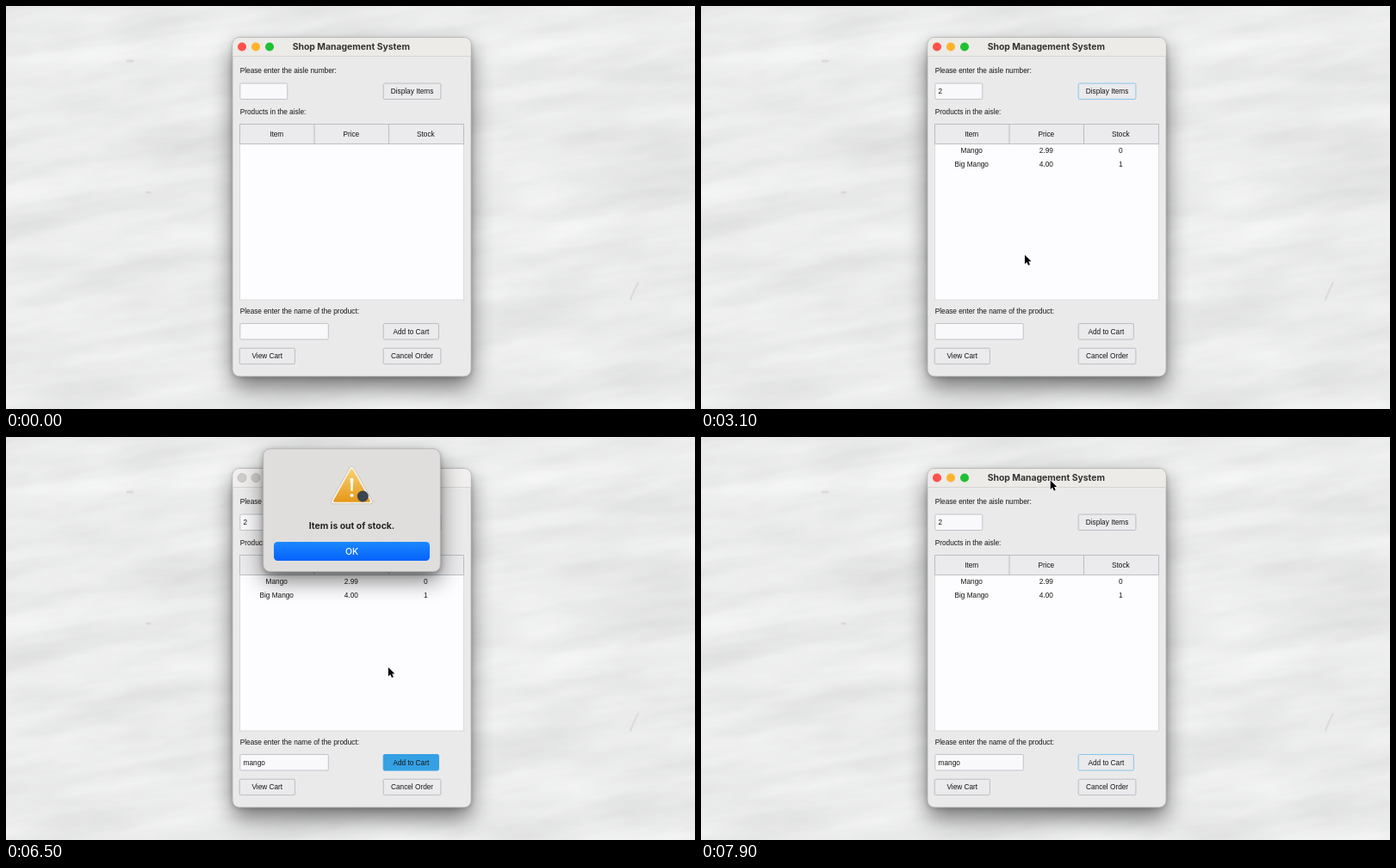
Write an HTML page that moves like this. It is 800 px wide and 469 px high and loops after 8000 ms.

```html
<!DOCTYPE html>
<html lang="en">
<head>
<meta charset="utf-8">
<title>Shop Management System</title>
<style>
  html, body { margin: 0; width: 100%; height: 100%; overflow: hidden; background: #ebebec; }
  svg { display: block; }
  text { font: 8.27px "Liberation Sans", Arial, sans-serif; fill: #161616; white-space: pre; }
  .mid { text-anchor: middle; }
  .title { font: 700 10.4px Inter, sans-serif; fill: #333; text-anchor: middle; }
  .button rect { fill: #ebeaec; stroke: #b9bec1; }
  .field rect { fill: #f9f8fa; stroke: #bec4c7; }
  .hover rect { stroke: #86c6ea; }
  .focus rect { stroke: #41ade8; stroke-width: 1.4; }
  .pressed rect { fill: #35a0e4; stroke: #35a0e4; }
  .inactive circle { fill: #cfcecd; stroke: #c2c1c0; }
  .inactive .bar { fill: #f0efee; }
  .inactive .title { fill: #aaa; }
</style>
</head>
<body>
<svg id="stage" width="800" height="469" viewBox="0 0 800 469">
  <defs>
    <filter id="plaster" x="0" y="0" width="1" height="1" color-interpolation-filters="sRGB">
      <feTurbulence type="fractalNoise" baseFrequency=".006 .028" numOctaves="5" seed="8"/>
      <feColorMatrix values=".12 0 0 0 .859  .12 0 0 0 .861  .12 0 0 0 .863  0 0 0 0 1"/>
    </filter>
    <filter id="soft" x="-50%" y="-50%" width="200%" height="200%"><feGaussianBlur stdDeviation="13"/></filter>
    <filter id="near" x="-50%" y="-50%" width="200%" height="200%"><feGaussianBlur stdDeviation="3"/></filter>
    <linearGradient id="gold" x2="0" y2="1"><stop stop-color="#f8cf71"/><stop offset="1" stop-color="#e5991b"/></linearGradient>
    <linearGradient id="blue" x2="0" y2="1"><stop stop-color="#1b88ff"/><stop offset="1" stop-color="#0562fa"/></linearGradient>
  </defs>

  <rect x="-60" y="-80" width="920" height="640" transform="rotate(-9 400 234)" filter="url(#plaster)"/>
  <g fill="none" stroke="#cfc9c4" stroke-linecap="round" opacity=".5">
    <path d="M725 342Q728 333 734 322" stroke-width="2"/>
    <path d="M164 217h3M141 64h6" stroke-width="3"/>
  </g>

  <rect x="263" y="50" width="277" height="394" rx="8" filter="url(#soft)" opacity=".5"/>
  <rect x="263" y="39" width="277" height="393" rx="8" filter="url(#near)" opacity=".24"/>

  <g id="win">
    <rect x="263" y="36.5" width="277" height="394.5" rx="8" fill="#ebeaeb" stroke="#b2b2b2" stroke-width=".8"/>
    <path class="bar" d="M263.4 58.5V44.5a7.6 7.6 0 0 1 7.6-7.6h261a7.6 7.6 0 0 1 7.6 7.6v14z" fill="#ecebe7"/>
    <path d="M263.4 58.5h276.2" stroke="#d5d4d2"/>
    <circle cx="274" cy="47.5" r="5" fill="#ff5049"/>
    <circle cx="290" cy="47.5" r="5" fill="#fcb32c"/>
    <circle cx="306" cy="47.5" r="5" fill="#1fc133"/>
    <text class="title" x="400.8" y="51.2">Shop Management System</text>
    <rect x="271.5" y="137.5" width="260" height="204.5" fill="#fdfcfe" stroke="#dadbdc"/>
    <path d="M271.5 137.5h260v23h-260zM358 137.5v23M444.5 137.5v23" fill="#ebeaec" stroke="#b8bfc1"/>
    <g id="form"></g>
    <g id="rows"></g>
  </g>

  <g id="alert">
    <rect x="299" y="25" width="205" height="142" rx="8" filter="url(#soft)" opacity=".5"/>
    <rect x="299" y="16" width="205" height="143" rx="8" filter="url(#near)" opacity=".3"/>
    <rect x="298.7" y="13.7" width="205.6" height="143" rx="8" fill="#dfdedd" stroke="#b3b2b1" stroke-width=".8"/>
    <path d="M401.5 37.5L422.5 75H380.5Z" fill="none" stroke="#b9b6ae" stroke-width="6.4" stroke-linejoin="round"/>
    <path d="M401.5 37.5L422.5 75H380.5Z" fill="none" stroke="#f7f3e8" stroke-width="5.2" stroke-linejoin="round"/>
    <path d="M401.5 38.5L421.5 74.5H381.5Z" fill="url(#gold)" stroke="url(#gold)" stroke-width="2.6" stroke-linejoin="round"/>
    <path d="M399.5 48h4l-1 15h-2z" fill="#fffaf0"/>
    <circle cx="401.5" cy="68" r="2.1" fill="#fffaf0"/>
    <circle cx="414.3" cy="69" r="6.5" fill="#3c444d"/>
    <text class="title" x="401.5" y="107.2" style="fill:#252525">Item is out of stock.</text>
    <rect x="311" y="122" width="181" height="22" rx="4.5" fill="url(#blue)"/>
    <text class="title" x="401.5" y="136.8" style="fill:#fff;font-weight:500">OK</text>
  </g>

  <g id="pointer">
    <path id="arrow" d="M0 0V10.4L2.4 8.2L4.1 12L6 11.2L4.4 7.5H7.6Z" stroke="#fff" stroke-width="1.3" paint-order="stroke" stroke-linejoin="round"/>
    <g id="beam" fill="none">
      <path d="M-3 -6Q0 -6 0 -4Q0 -6 3 -6M0 -4V4M-3 6Q0 6 0 4Q0 6 3 6M-1.5 1.5h3" stroke="#fff" stroke-width="2.4"/>
      <path d="M-3 -6Q0 -6 0 -4Q0 -6 3 -6M0 -4V4M-3 6Q0 6 0 4Q0 6 3 6M-1.5 1.5h3" stroke="#111" stroke-width="1.1"/>
    </g>
  </g>
</svg>
<script>
const LOOP = 8000, STEP = 100;
const $ = id => document.getElementById(id);
const label = (s, x, y, cls = '') => `<text class="${cls}" x="${x}" y="${y + 2.9}">${s}</text>`;
const box = (x, y, w) => `<rect x="${x + .5}" y="${y + .5}" width="${w - 1}" height="18.5" rx="1.5"/>`;
const button = (id, s, x, y, w) =>
  `<g id="${id}" class="button">${box(x, y, w)}${label(s, x + w / 2, y + 9.7, 'mid')}</g>`;
const field = (id, x, y, w) =>
  `<g id="${id}" class="field">${box(x, y, w)}${label('', x + 4.3, y + 9.7)}<path stroke="#111" stroke-width=".9"/></g>`;
const row = (cells, y) => cells.map((s, i) => label(s, 314.2 + i * 86.6, y, 'mid')).join('');

$('form').innerHTML =
  label('Please enter the aisle number:', 271.7, 75.5) +
  label('Products in the aisle:', 271.7, 123.3) +
  label('Please enter the name of the product:', 271.7, 355.5) +
  row(['Item', 'Price', 'Stock'], 148.7) +
  field('aisle', 271.3, 89.5, 56) + field('product', 271.3, 369, 103.5) +
  button('display', 'Display Items', 437.7, 89.5, 67.7) +
  button('add', 'Add to Cart', 437.7, 369, 65.2) +
  button('view', 'View Cart', 270.7, 397.7, 65.2) +
  button('cancel', 'Cancel Order', 437.7, 397.7, 67.7);
$('rows').innerHTML = row(['Mango', '2.99', '0'], 168.5) + row(['Big Mango', '4.00', '1'], 184.5);

// Pointer stops: time, x, y
const path = [
  [100, 444, 153], [700, 434.7, 48], [900, 434.7, 48], [1500, 300, 98], [2100, 300, 98],
  [2400, 432.7, 97.7], [2600, 462, 100], [2800, 462, 100], [3200, 360, 325], [3300, 360, 325],
  [3500, 307.7, 377.7], [5300, 307.7, 377.7], [5800, 432.3, 381.7], [6000, 462, 386],
  [6300, 462, 386], [6700, 425.7, 150], [7100, 415, 134], [7400, 415, 134], [7800, 405.7, 50.5]
];
const aisleKeys = [1700], productKeys = [4300, 4450, 4600, 4800, 4900];

function pointerAt(t) {
  const i = path.findIndex(p => p[0] > t);
  if (i < 0) return path[path.length - 1].slice(1);
  const [t0, x0, y0] = path[Math.max(i - 1, 0)], [t1, x1, y1] = path[i];
  const k = Math.max(0, (t - t0) / (t1 - t0)), e = k * k * (3 - 2 * k);
  return [x0 + (x1 - x0) * e, y0 + (y1 - y0) * e];
}

const show = (id, on) => $(id).style.display = on ? '' : 'none';
const within = (t, a, b) => t >= a && t < b;

function look(id, states) {
  for (const s in states) $(id).classList.toggle(s, states[s]);
}

function type(id, word, keys, t, focused, since) {
  const g = $(id), text = g.querySelector('text'), caret = g.querySelector('path');
  const typed = keys.filter(k => k <= t);
  text.textContent = word.slice(0, typed.length);
  const start = typed.length ? typed[typed.length - 1] : since;
  caret.style.display = focused && (t - start) % 900 < 600 ? '' : 'none';
  const x = +text.getAttribute('x') + text.getComputedTextLength() + .6;
  caret.setAttribute('d', `M${x} ${text.getAttribute('y') - 7.2}v9`);
  g.classList.toggle('focus', focused);
}

function draw(t) {
  const [x, y] = pointerAt(t);
  const alertOn = within(t, 6300, 7500);
  const overAisle = x > 272 && x < 327 && y > 90 && y < 109;
  const overProduct = x > 272 && x < 374 && y > 370 && y < 389;
  const beam = overAisle || overProduct;

  type('aisle', '2', aisleKeys, t, within(t, 1600, 2700), 1600);
  type('product', 'mango', productKeys, t, within(t, 4100, 6100), 4100);
  look('aisle', { hover: overAisle });
  look('product', { hover: overProduct });
  look('display', { hover: within(t, 2500, 4100), pressed: t === 2700 });
  look('add', { hover: t >= 5900, pressed: within(t, 6100, 7900) });
  look('win', { inactive: alertOn });

  show('rows', t >= 2800);
  show('alert', alertOn);
  show('pointer', t >= 100 && !within(t, 1700, 2100) && !within(t, 4300, 5300));
  show('arrow', !beam);
  show('beam', beam);
  $('pointer').setAttribute('transform', `translate(${x} ${y})`);
}

function tick(now) {
  draw(Math.floor(now % LOOP / STEP) * STEP);
  requestAnimationFrame(tick);
}
draw(0);
requestAnimationFrame(tick);
</script>
</body>
</html>
```
